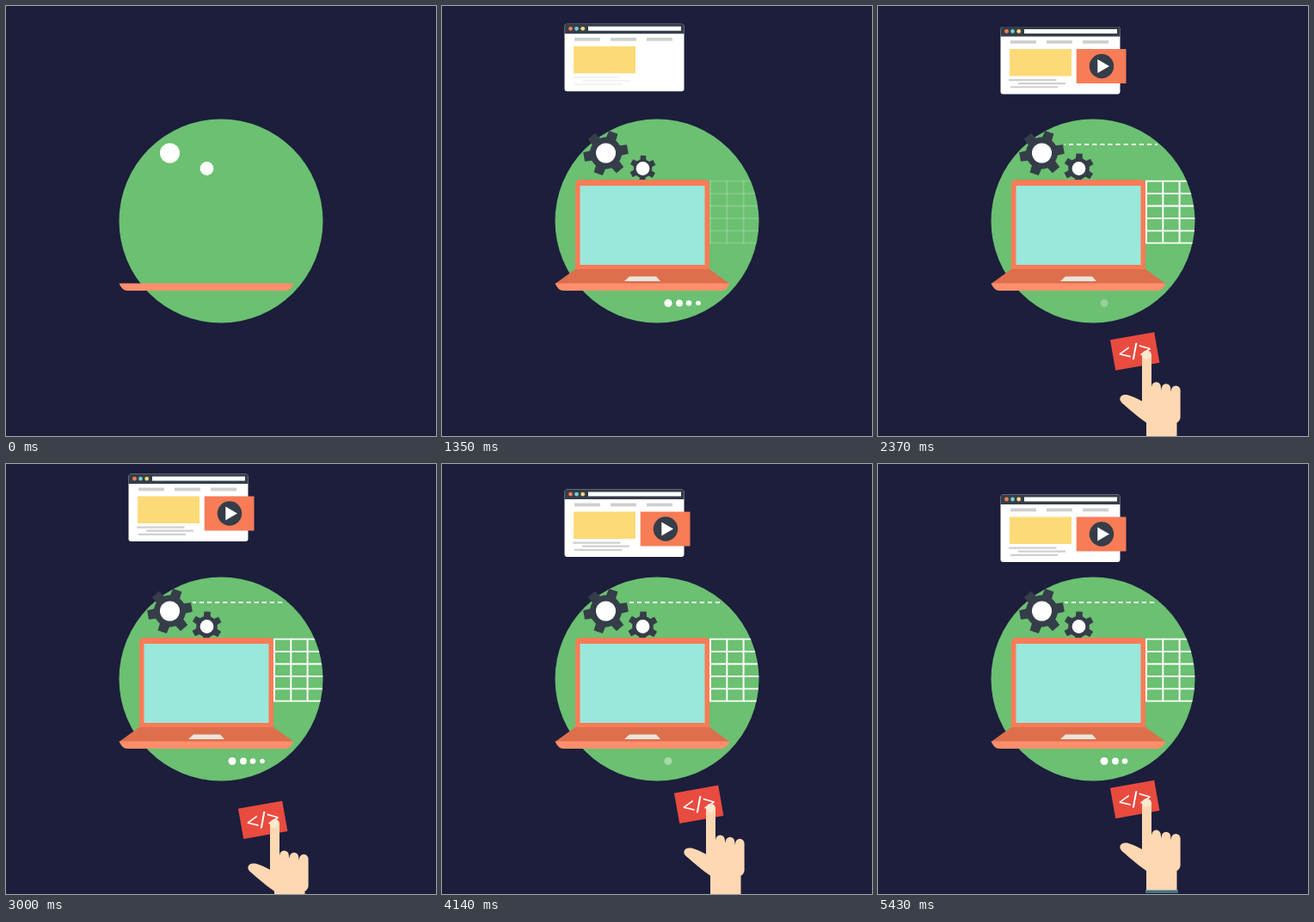
Recreate the animation shown at these times as an HTML page with a canvas. Size 500x500 px, loop 5460 ms.

```html
<!DOCTYPE html>
<html>
<head>
<meta charset="utf-8">
<style>
html, body { margin: 0; width: 100%; height: 100%; overflow: hidden; background: #1c1e3c; }
canvas { display: block; }
</style>
</head>
<body>
<canvas id="stage" width="500" height="500"></canvas>
<script>
const ctx = document.getElementById('stage').getContext('2d');
const LOOP = 5460, STEP = 30;
const DARK = '#353d49', ORANGE = '#f87c56', WHITE = '#fff';

const ramp = (t, start, end) => Math.min(1, Math.max(0, (t - start) / (end - start)));
const easeOut = p => 1 - (1 - p) ** 3;

function rect(color, x, y, w, h, r = 0) {
  ctx.fillStyle = color;
  ctx.beginPath();
  ctx.roundRect(x, y, w, h, r);
  ctx.fill();
}

function disc(color, x, y, r) {
  ctx.fillStyle = color;
  ctx.beginPath();
  ctx.arc(x, y, r, 0, 2 * Math.PI);
  ctx.fill();
}

function poly(color, ...p) {
  ctx.fillStyle = color;
  ctx.beginPath();
  for (let i = 0; i < p.length; i += 2) ctx.lineTo(p[i], p[i + 1]);
  ctx.fill();
}

// Run a drawing with its own opacity and transform.
function layer(alpha, draw) {
  if (alpha <= 0) return;
  ctx.save();
  ctx.globalAlpha *= alpha;
  draw();
  ctx.restore();
}

function gear(x, y, outer, body, hub, angle, grow) {
  layer(grow > 0 ? 1 : 0, () => {
    ctx.translate(x, y);
    ctx.scale(grow, grow);
    ctx.rotate(angle * Math.PI / 180);
    disc(DARK, 0, 0, body);
    const a = outer * 0.21, b = outer * 0.27;
    for (let i = 0; i < 6; i++) {
      poly(DARK, 0, -b, outer, -a, outer, a, 0, b);
      ctx.rotate(Math.PI / 3);
    }
  });
  disc(WHITE, x, y, hub);
}

function grid(t) {
  layer(ramp(t, 1300, 1600), () => {
    ctx.beginPath();
    ctx.arc(250, 250, 118.5, 0, 2 * Math.PI);
    ctx.clip();
    for (let i = 0; i < 3; i++) rect(WHITE, 311 + i * 19.3, 203, 2, 73);
    for (let i = 0; i < 6; i++) rect(WHITE, 311, 202.8 + i * 14.4, 58, 1.8);
  });
}

function dashes(t) {
  const end = 217 + 108 * ramp(t, 1430, 1780);
  ctx.save();
  ctx.beginPath();
  ctx.rect(217, 155, end - 217, 12);
  ctx.clip();
  ctx.strokeStyle = WHITE;
  ctx.lineWidth = 2.2;
  ctx.setLineDash([5, 4.1]);
  ctx.lineDashOffset = -(8 + (t - 3000) * 0.0337);
  ctx.beginPath();
  ctx.moveTo(217, 161);
  ctx.lineTo(325, 161);
  ctx.stroke();
  ctx.restore();
}

function laptop(t) {
  const tilt = ramp(t, 630, 1025) * Math.PI / 2;
  const s = Math.sin(tilt), w = 3.6 * Math.cos(tilt);
  if (s > 0) {
    const top = 306 - 104 * s, r = 5 * s;
    ctx.fillStyle = ORANGE;
    ctx.beginPath();
    ctx.moveTo(155, 306);
    ctx.arcTo(155 - w, top, 250, top, r);
    ctx.arcTo(311 + w, top, 311, 306, r);
    ctx.lineTo(311, 306);
    ctx.fill();
    const up = 306 - 97 * s, low = 306 - 5 * s;
    poly('#9ae7db', 160.5 - w, up, 305.5 + w, up, 305.5, low, 160.5, low);
  }
  if (t >= 120) poly('#dd6f4d', 155, 306, 311, 306, 334.5, 323, 131.5, 323);
  if (t >= 450) poly('#e9e5dd', 218, 314.5, 249, 314.5, 254, 320, 212, 320);
  ctx.fillStyle = '#ff8f6c';
  ctx.beginPath();
  ctx.moveTo(131.5, 322.5);
  ctx.lineTo(334.5, 322.5);
  ctx.quadraticCurveTo(331, 331, 325, 331);
  ctx.lineTo(141, 331);
  ctx.quadraticCurveTo(135, 331, 131.5, 322.5);
  ctx.fill();
}

// Dots vanish from right to left, then return in the same order.
function dots(t) {
  const shown = ramp(t, 660, 800);
  const phase = t < 1653 ? 1600 : (t - 1653) % 1792;
  [[263, 4.5], [276, 3.9], [287, 3.3], [298, 2.8]].forEach(([x, r], i) => {
    const k = 3 - i;
    const out = ramp(phase, k * 193, k * 193 + 193);
    const back = ramp(phase, 772 + k * 125, 897 + k * 125);
    layer(shown * (1 - out + back), () => disc(WHITE, x, 345.5, r));
  });
}

function browser(t, y) {
  layer(ramp(t, 720, 870), () => {
    ctx.translate(0, y);
    rect(WHITE, 142.5, 0, 139, 78.5, 3);
    layer(ramp(t, 960, 1080), () => {
      rect(DARK, 142.5, 0, 139, 11.5, [3, 3, 0, 0]);
      disc(ORANGE, 149.5, 5.5, 2.4);
      disc('#72d0cf', 156.5, 5.5, 2.4);
      disc('#fdd977', 163.7, 5.5, 2.4);
      rect(WHITE, 170, 3, 108, 5);
    });
    layer(ramp(t, 1080, 1200), () => {
      for (const x of [154, 196, 238]) rect('#cfcfcf', x, 16, 30, 3.8);
    });
    layer(ramp(t, 1200, 1320), () => rect('#fdda78', 153, 26, 72, 31.5));
    layer(ramp(t, 1320, 1440), () => {
      rect('#cfcfcf', 152, 61, 55.5, 2.2);
      rect('#cfcfcf', 163, 65, 55, 2.2);
      rect('#cfcfcf', 154, 69.2, 55, 2.2);
    });
    layer(ramp(t, 1440, 1560), () => rect(ORANGE, 230.7, 26, 57.8, 40));
    layer(ramp(t, 1560, 1785), () => disc(DARK, 260, 46, 14.2));
    layer(ramp(t, 1560, 1680), () => poly(WHITE, 255.3, 38, 269, 46, 255.3, 54));
  });
}

function card(t, y) {
  const grow = easeOut(ramp(t, 1860, 2100));
  layer(grow > 0 ? 1 : 0, () => {
    ctx.translate(298.7, y + 1);
    ctx.rotate(-10 * Math.PI / 180);
    ctx.scale(grow, grow);
    rect('#e94b3f', -26, -18, 52, 36);
    ctx.fillStyle = WHITE;
    ctx.font = '26px "Open Sans", sans-serif';
    ctx.textAlign = 'center';
    ctx.fillText('</>', 0, 9.3);
  });
}

function hand(y) {
  ctx.save();
  ctx.translate(0, y);
  rect('#477184', 311, 106, 38, 4);
  ctx.fillStyle = '#fdd8b2';
  ctx.beginPath();
  ctx.moveTo(307, 59);
  ctx.lineTo(307, 5.5);
  ctx.arc(312.5, 5.5, 5.5, Math.PI, 0);
  ctx.lineTo(318, 42);
  ctx.arc(323.5, 42, 5.3, Math.PI, 0);
  ctx.lineTo(329.5, 46);
  ctx.arc(335, 44, 5.2, Math.PI, 0);
  ctx.lineTo(340.7, 48);
  ctx.arc(346.3, 46.3, 5.3, Math.PI, 0);
  ctx.lineTo(351.6, 78);
  ctx.quadraticCurveTo(351, 82, 347.5, 84);
  ctx.lineTo(347.5, 106.5);
  ctx.lineTo(312, 106.5);
  ctx.lineTo(312, 84);
  ctx.bezierCurveTo(303, 78, 293, 69, 283.5, 61);
  ctx.bezierCurveTo(278, 55, 284, 50, 291, 52);
  ctx.quadraticCurveTo(298, 54, 307, 59);
  ctx.fill();
  ctx.fillStyle = '#fce9cf';
  ctx.beginPath();
  ctx.ellipse(312.5, 5.5, 5, 5.2, 0, 0, 2 * Math.PI);
  ctx.fill();
  ctx.restore();
}

function draw(t) {
  const bob = 24.4 - 15.2 * Math.cos(2 * Math.PI * (t - 950) / 1882);
  rect('#1c1e3c', 0, 0, 500, 500);
  disc('#6bc071', 250, 250, 118.5);
  grid(t);
  dashes(t);
  gear(190.5, 171, 25.8, 18.5, 11.5, -10, easeOut(ramp(t, 1080, 1380)));
  gear(233.5, 189, 17.3, 12.3, 7.9, 32, easeOut(ramp(t, 1200, 1500)));
  laptop(t);
  dots(t);
  browser(t, bob);
  const tip = 424.4 - bob + 120 * (1 - easeOut(ramp(t, 1350, 1710)));
  card(t, tip);
  if (t >= 1200) hand(tip);
}

const start = performance.now();
function frame() {
  const t = (performance.now() - start) % LOOP;
  draw(Math.floor(t / STEP) * STEP);
  requestAnimationFrame(frame);
}
frame();
</script>
</body>
</html>
```
